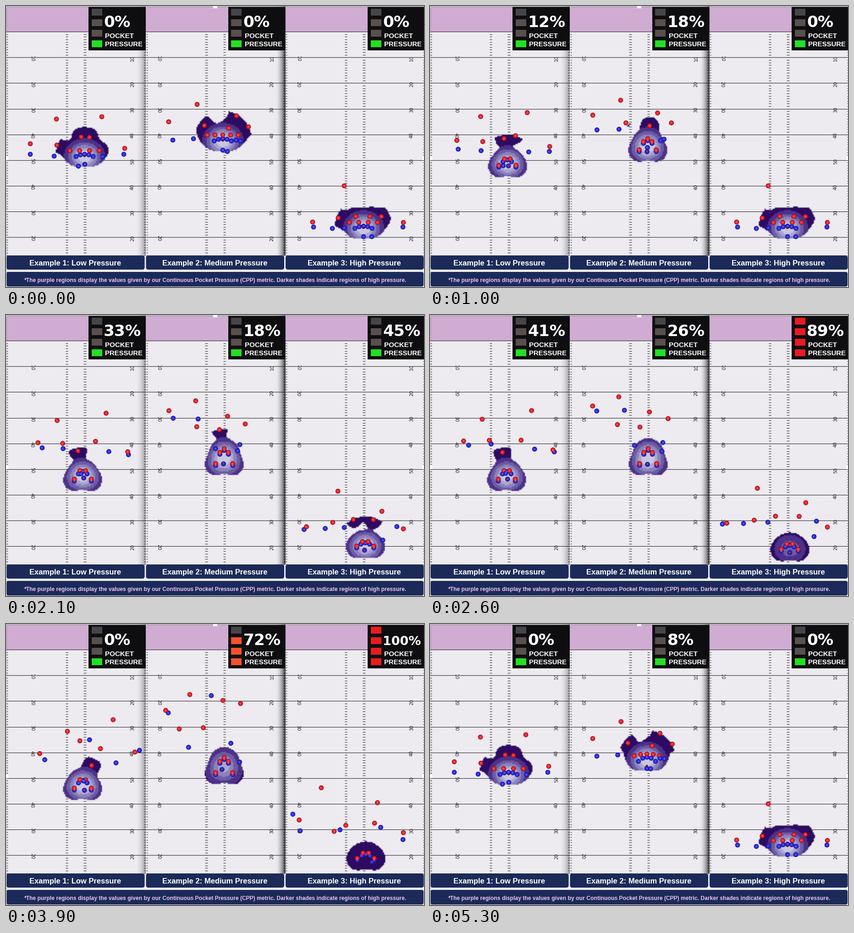
A matplotlib script that plays this animation: 912 by 614 pixels, repeating every 5400 ms.

```python
import numpy as np
import matplotlib.pyplot as plt
from matplotlib.animation import FuncAnimation
from matplotlib.colors import to_rgba
from matplotlib.patches import FancyBboxPatch, Rectangle

W, H, DPI = 912, 614, 64
PT = 72 / DPI
FRAMES, STEP = 54, 100
PITCH = 304.5
TOP, YARD = 56.2, 5.613
COUNT_TIMES = (0, 1.0, 1.7, 2.6, 3.9, 4.6)

NAVY, FIELD, PINK, BLACK = "#1b2a58", "#edebf0", "#d0acd2", "#0e0e10"
RED, BLUE, BALL = "#ea1a24", "#2424e2", "#8a1620"
EDGES = {RED: "#7c1016", BLUE: "#10107c", BALL: "#5a0c12"}
SHADES = np.array([to_rgba(c) for c in ("#2d0b62", "#4d3188", "#6c5ba5",
                                        "#8b82bc", "#aaa5d0", "#c9c6e2")])
REACH = 63                      # radius of the pocket
GRID = np.arange(-69, 70, 2.5)
OFFSETS = np.stack(np.meshgrid(GRID, GRID), axis=-1)

rng = np.random.default_rng(4)
fig = plt.figure(figsize=(W / DPI, H / DPI), dpi=DPI, facecolor="#f2f0f5")
ax = fig.add_axes([0, 0, 1, 1])
ax.axis("off")


def box(x0, y0, x1, y1, color, radius=0, z=1):
    if radius:
        patch = FancyBboxPatch((x0 + radius, y0 + radius), x1 - x0 - 2 * radius,
                               y1 - y0 - 2 * radius, fc=color, ec="none", zorder=z,
                               boxstyle=f"round,pad={radius}")
    else:
        patch = Rectangle((x0, y0), x1 - x0, y1 - y0, fc=color, ec="none", zorder=z)
    return ax.add_patch(patch)


def label(x, y, text, size, color="white", font="Liberation Sans", z=9, **kw):
    kw = {"weight": "bold", **kw}
    return ax.text(x, y, text, fontsize=size * PT, color=color, family=font,
                   zorder=z, **kw)


def ease(x):
    x = np.clip(x, 0, 1)
    return x * x * (3 - 2 * x)


def mix(a, b, s):
    return a + (b - a) * s


def density(points, spots, sigma, weights):
    """Weighted sum of round bumps around the spots."""
    gaps = ((points[..., None, :] - spots) ** 2).sum(-1)
    return (np.exp(-gaps / (2 * sigma**2)) * weights).sum(-1)


class Panel:
    def __init__(self, index, title, center, drift, arc, rushers, step,
                 snap, restart, lag, counts):
        self.x0 = index * PITCH
        self.center, self.drift = np.array(center, float), np.array(drift, float)
        self.arc, self.rushers, self.step = arc, rushers, step
        self.snap, self.restart, self.lag, self.counts = snap, restart, lag, counts
        self.routes, self.route_colors, self.marks = [], [], []
        self.draw_field(index)
        self.draw_board()
        box(self.x0 + 1, 545, self.x0 + 302.5, 576, NAVY, 5, z=8)
        label(self.x0 + 151, 560.5, title, 16.5, ha="center", va="center_baseline")

    def draw_field(self, index):
        x0 = self.x0
        box(x0, 1.5, x0 + PITCH, 90, PINK, 6)
        box(x0, TOP, x0 + PITCH, 545, FIELD)
        lines = TOP + 10 * YARD * np.arange(9)
        ax.hlines(lines, x0, x0 + PITCH, color="#3a3a3e", lw=1.2 * PT, zorder=2)
        ticks = np.arange(TOP + YARD, 545, YARD)
        for a, b in ((1, 4), (129.5, 135), (169, 174.5), (300.5, 303.5)):
            ax.hlines(ticks, x0 + a, x0 + b, color="#3c3c40", lw=1.2 * PT, zorder=2)
        for i, y in enumerate(lines[1:], 1):
            for x, turn in ((28.5 if index else 57, -90), (276, 90)):
                label(x0 + x, y + 2.5, 10 * min(i, 10 - i), 10, "#222226",
                      "DejaVu Sans", 2, rotation=turn, ha="center", va="center",
                      weight="normal")
        if index < 2:
            shade = np.zeros((1, 40, 4))
            shade[..., 3] = (0.35 + 0.4 * index) * np.linspace(0, 1, 40) ** 2
            ax.imshow(shade, extent=(x0 + 282, x0 + PITCH, 545, 0), aspect="auto",
                      zorder=3)

    def draw_board(self):
        x0 = self.x0
        box(x0 + 180, 1.5, x0 + PITCH, 96.5, BLACK, z=6)
        self.lamps = [box(x0 + 186.5, 74.5 - 23 * i, x0 + 209.5, 90 - 23 * i, BLACK, z=7)
                      for i in range(4)]
        self.percent = label(x0 + 213, 45.5, "", 34.3, font="DejaVu Sans")
        label(x0 + 216, 70.5, "POCKET", 15.1)
        label(x0 + 216, 88, "PRESSURE", 14.9)

    def route(self, color, *stops):
        """Start, optional middle and end of a run."""
        stops = np.array(stops, float)
        if len(stops) == 2:
            stops = np.insert(stops, 1, stops.mean(0), axis=0)
        self.routes.append(stops)
        self.route_colors.append(color)

    def offense(self, *stops):
        self.route(BLUE, *stops)

    def defense(self, *stops):
        self.route(RED, *stops)

    def cover(self, x, y):
        """A defender who shadows the player added last."""
        self.marks.append((len(self.routes) - 1, x, y))

    def build(self):
        self.routes = np.array(self.routes).swapaxes(0, 1)
        marks = np.array(self.marks)
        self.marked, self.cover_start = marks[:, 0], marks[:, 1:]
        self.colors = ([BLUE] * 5 + [RED] * self.rushers + self.route_colors
                       + [RED] * len(marks) + [BALL])
        self.red = np.array([c == RED for c in self.colors])
        sizes = [(4 if c == BALL else 9.8) * PT for c in self.colors]
        self.region = ax.imshow(np.zeros((len(GRID), len(GRID), 4)), aspect="auto",
                                interpolation="bilinear", zorder=4)
        self.dots = ax.scatter(np.zeros(len(sizes)), np.zeros(len(sizes)),
                               s=np.square(sizes), c=self.colors,
                               edgecolors=[EDGES[c] for c in self.colors],
                               linewidths=0.9 * PT, zorder=5)
        self.numbers = [label(0, 0, rng.integers(10, 99), 4.6,
                              "#ffb4b4" if c == RED else "#b8b8ff", z=5.1, alpha=0.7,
                              ha="center", va="center_baseline", weight="normal")
                        for c in self.colors[:-1]]

    def line(self, k, s):
        """Blocking line, slot k from -2 to 2, bending back into a pocket."""
        bow = np.stack([9.3 * k, (1.2 + self.arc * s) * k**2], axis=-1)
        return self.center + bow + self.drift * s

    def pose(self, u):
        since = u - self.snap
        block = ease(since / 1.6)
        line = self.line(np.linspace(-2, 2, 5), block)

        k = np.linspace(-2, 2, self.rushers)
        half = self.step * (self.rushers - 1) / 4
        front = self.center + np.stack([half * k, np.full_like(k, -8)], axis=-1)
        rush = mix(front, self.line(k, block) - (0, 4), ease(since / 0.9))

        start, middle, end = self.routes
        runs = (mix(start, middle, ease(since / (3 - self.snap)))
                + (end - middle) * ease((u - 2.2) / (self.restart - 2.35)))
        cover = self.cover_start + 0.65 * (runs - start)[self.marked]
        ball = mix(self.center + (0, 4), runs[0], ease(since / 0.6))
        return np.vstack([line, rush, runs, cover, ball])

    def shade_region(self, spots, pressure):
        """Region near the line and its rushers, light where blockers are dense."""
        line, quarterback = spots[:5], spots[5 + self.rushers]
        core = line.mean(0)
        points = core + OFFSETS
        near = np.vstack([line, spots[self.red]])
        weight = np.clip((REACH + 11 - np.hypot(*(near - core).T)) / 16, 0, 1)
        inside = ((density(points, near, 11, weight) > 0.2)
                  & (np.hypot(*np.moveaxis(OFFSETS, -1, 0)) < REACH))

        safe = density(points, np.vstack([line, quarterback]), 20, 1)
        safe *= (1 - 0.85 * pressure**4) / safe.max()
        image = SHADES[np.clip(safe * 6, 0, 5).astype(int)]
        image[..., 3] = inside
        self.region.set_data(image)
        (left, top), (right, bottom) = points[0, 0] - 1.25, points[-1, -1] + 1.25
        self.region.set_extent((left, right, bottom, top))

    def show_count(self, value):
        self.percent.set_text(f"{value}%")
        self.percent.set_fontsize((27 if value > 99 else 34.3) * PT)
        lit, color = ((4, "#e81c20") if value > 85 else (3, "#f2532a") if value > 65
                      else (2, "#f0c528") if value > 50 else (1, "#22e022"))
        for i, lamp in enumerate(self.lamps):
            off = "#464648" if i == 3 else "#594f4c"
            lamp.set_facecolor(color if i < lit else off)

    def update(self, t):
        if t < self.restart:
            u = t
            value = np.interp(t, COUNT_TIMES[:len(self.counts)], self.counts)
        else:
            u = max(0, t - self.lag)
            value = 20 * u
        self.show_count(int(round(value)))
        spots = self.pose(u)
        self.dots.set_offsets(spots)
        for number, spot in zip(self.numbers, spots):
            number.set_position(spot)
        self.shade_region(spots, value / 100)


# In each panel the first offensive route is the quarterback's.
low = Panel(0, "Example 1: Low Pressure", center=(171.5, 324), drift=(-4, 18), arc=4,
            rushers=4, step=21.5, snap=0, restart=5.0, lag=5.4,
            counts=(0, 12, 27, 41, 0, 3))
low.offense((172, 346), (169, 359), (172, 365))
low.offense((158, 350), (172, 342))
low.offense((211, 329), (228, 290), (245, 309))
low.offense((53, 324), (86, 281), (84, 303))
low.cover(53, 301)
low.offense((105, 328), (130, 282), (204, 241))
low.cover(111, 304)
low.offense((257, 324), (270, 300), (300, 266))
low.cover(259, 311)
low.defense((110, 247), (112, 226), (143, 238))
low.defense((209, 242), (221, 207), (239, 210))
low.defense((164, 286), (155, 300), (200, 313))
low.defense((182, 287), (199, 273), (209, 272))

medium = Panel(1, "Example 2: Medium Pressure", center=(473, 290), drift=(3, 6), arc=7,
               rushers=5, step=17, snap=0, restart=4.4, lag=4.9,
               counts=(0, 18, 11, 26, 72))
medium.offense((473, 315), (475, 328), (471, 317))
medium.offense((483, 318), (450, 285), (394, 268))
medium.cover(433, 261)
medium.offense((364, 293), (365, 207), (353, 193))
medium.cover(355, 253)
medium.offense((409, 290), (422, 210), (450, 152))
medium.offense((502, 293), (510, 302))
medium.offense((511, 295), (510, 280), (489, 259))
medium.defense((417, 215), (413, 180), (400, 152))
medium.defense((486, 267), (460, 246), (428, 225))
medium.defense((503, 240), (478, 216), (473, 163))
medium.defense((529, 264), (520, 231), (511, 169))

high = Panel(2, "Example 3: High Pressure", center=(780, 481), drift=(5, 22), arc=2,
             rushers=4, step=20.5, snap=1.0, restart=5.0, lag=5.4,
             counts=(0, 0, 9, 89, 100, 100))
high.offense((780, 504), (784, 521), (805, 520))
high.offense((798, 504), (840, 483), (877, 466))
high.offense((671, 483), (635, 458), (622, 398))
high.cover(669, 472)
high.offense((712, 486), (685, 452), (624, 452))
high.offense((866, 483), (843, 447), (807, 443))
high.offense((738, 485), (738, 449), (725, 450))
high.defense((738, 393), (714, 379), (677, 349))
high.defense((867, 473), (867, 453))
high.defense((725, 463), (704, 446), (721, 456))
high.defense((763, 460), (754, 437), (736, 441))
high.defense((794, 460), (807, 438), (803, 434))
high.defense((819, 460), (821, 406), (806, 384))

panels = (low, medium, high)
for panel in panels:
    panel.build()

box(1, 581, 911, 613, NAVY, 4, z=8)
label(456.5, 598, "*The purple regions display the values given by our Continuous Pocket "
      "Pressure (CPP) metric. Darker shades indicate regions of high pressure.",
      12.13, "#ecc4f4", ha="center", va="center_baseline")

# Selection frame with its handles
ax.hlines(0.7, 0, W, color="#8c8a90", lw=1.2 * PT, zorder=10)
ax.vlines((0.5, W - 0.5), 0, H, color="#77757c", lw=PT, ls=(0, (2, 2)), zorder=10)
for x, y in ((456, 0), (0, 332), (W, 332)):
    box(x - 4.5, y - 4.5, x + 4.5, y + 4.5, "white", z=11)


def draw(frame):
    for panel in panels:
        panel.update(frame * STEP / 1000)
    ax.set_xlim(0, W)
    ax.set_ylim(H, 0)
    return []


anim = FuncAnimation(fig, draw, frames=FRAMES, interval=STEP, repeat=True,
                     repeat_delay=0, blit=False)
plt.show()
```
